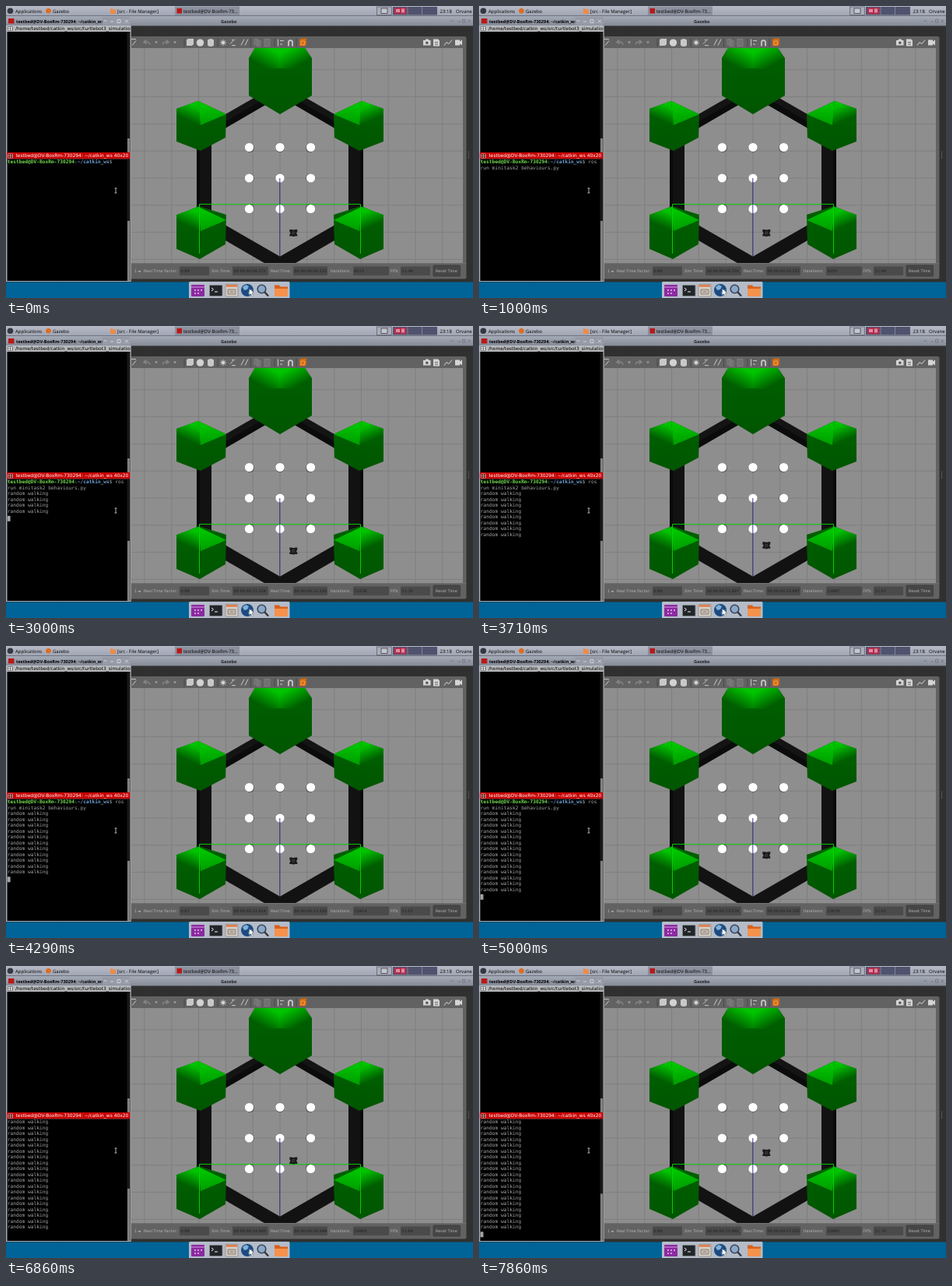
An HTML page that plays this animation: 600x375 px, repeating every 8000 ms.

```html
<!DOCTYPE html>
<html>
<head>
<meta charset="utf-8">
<title>Robot simulation desktop</title>
<style>
  html, body { margin: 0; width: 100%; height: 100%; overflow: hidden; background: #00618f; }
  svg { display: block; width: 600px; height: 375px; }
  text { font: 6px "Open Sans", sans-serif; white-space: pre; text-rendering: geometricPrecision; }
  .bold { font-weight: 700; font-size: 5.6px; }
  .wide { font: 5.95px "DejaVu Sans", sans-serif; }
  .status text { font: 5px "DejaVu Sans", sans-serif; fill: #b4b4b4; }
  .status .value { fill: #202020; }
  .term text { font: 6.23px "DejaVu Sans Mono", monospace; fill: #a4a4a4; }
  .term .host { fill: #70d850; font-weight: 700; }
  .term .dir { fill: #6f9fd0; font-weight: 700; }
</style>
</head>
<body>
<svg viewBox="0 0 600 375" xmlns="http://www.w3.org/2000/svg">
  <defs>
    <linearGradient id="desk" x2="0" y2="1"><stop stop-color="#005c8a"/><stop offset="1" stop-color="#006498"/></linearGradient>
    <linearGradient id="panel" x2="0" y2="1"><stop stop-color="#b6bac6"/><stop offset="1" stop-color="#a0a5b3"/></linearGradient>
    <linearGradient id="bar" x2="0" y2="1"><stop stop-color="#a6abb8"/><stop offset="1" stop-color="#858a97"/></linearGradient>
    <linearGradient id="shade" x2="0" y2="1"><stop stop-color="#006000"/><stop offset="1" stop-color="#005600"/></linearGradient>
    <linearGradient id="headFade" gradientUnits="userSpaceOnUse" x1="346" y1="58" x2="334" y2="80"><stop stop-color="#00c400"/><stop offset="1" stop-color="#005e00"/></linearGradient>
    <linearGradient id="leftFade" gradientUnits="userSpaceOnUse" x1="243" y1="128" x2="235" y2="147"><stop stop-color="#00c400"/><stop offset="1" stop-color="#005e00"/></linearGradient>
    <linearGradient id="rightFade" gradientUnits="userSpaceOnUse" x1="260" y1="127" x2="264" y2="152"><stop stop-color="#00c400"/><stop offset="1" stop-color="#009c00"/></linearGradient>
    <clipPath id="view"><rect x="161" y="54" width="426" height="276"/></clipPath>
    <clipPath id="pane"><rect x="1" y="13" width="158.5" height="340"/></clipPath>
    <g id="lit">
      <path fill="url(#leftFade)" d="M219 132L247 122L250 153L219 153Z"/>
      <path fill="url(#rightFade)" d="M247 122L283 139L250 153Z"/>
    </g>
    <g id="half">
      <path fill="#121212" d="M245 170H264V275H245Z"/>
      <path fill="#0a0a0a" d="M245 170H249V275H245Z"/>
      <path fill="#141414" d="M268 147L322 116L340 123L278 159Z"/>
      <path fill="#0b0b0b" d="M278 159L340 123L331 120L274 153Z"/>
      <path fill="#121212" d="M276 278L352.500 322V342L268 293Z"/>
      <path fill="url(#shade)" d="M219 132L247 122L283 139L282 169L250 186L219 174Z"/>
      <path fill="url(#shade)" d="M219 269L248 257L283 268L282 306L249 325L219 312Z"/>
      <use href="#lit"/><use href="#lit" y="136"/>
    </g>
    <path id="headSide" fill="url(#headFade)" d="M312 67L320 54H352.500V80L312 82Z"/>
  </defs>

  <rect width="600" height="375" fill="url(#desk)"/>

  <!-- simulator window -->
  <rect x="0" y="13" width="600" height="341.500" fill="#303030"/>
  <rect x="0" y="13" width="600" height="12.500" fill="url(#bar)"/>
  <text class="bold" x="276" y="21.700" fill="#222">Gazebo</text>
  <path d="M571.500 18l2 2 2-2M580.500 20h3.500M586.500 17.500h3.500v3.500h-3.500zM593.500 17.500l3.500 3.500m0-3.500l-3.500 3.500" fill="none" stroke="#666a75" stroke-width=".7"/>
  <rect x="140" y="39" width="451.500" height="311.500" rx="2.500" fill="#626262"/>
  <path d="M594.500 187v9" stroke="#777" stroke-dasharray="1 1"/>
  <g id="tools" fill="none" stroke="#c8c8c8" transform="translate(0 .6)">
    <path stroke="#858585" stroke-width="1.500" d="M185 49q-1-5-7-3m2-3l-3 3 4 2M201 49q1-5 7-3m-2-3l3 3-4 2"/>
    <path stroke="#474747" d="M229 41v11M272 41v11M314.500 41v11M345 41v11M373 41v11"/>
    <path d="M161 42h6M162 50l5-6" />
    <path fill="#a0a0a0" stroke="none" d="M191 45h4l-2 3zM215 45h4l-2 3z"/>
    <path fill="#c8c8c8" stroke="none" d="M232 43l2-1.500h7v7l-2 2h-7zM259 43q4-3 8 0v7q-4 3-8 0z"/>
    <circle cx="249.500" cy="46.500" r="4.700" fill="#d2d2d2" stroke="none"/>
    <path d="M275 46.500h8M279 42.500v8M276 43.500l6 6m0-6l-6 6M288 48l6-6M290 50h5M290 43h2M302 50l4-8m1 8l4-8"/>
    <circle cx="279" cy="46.500" r="2" fill="#d8d8d8" stroke="none"/>
    <path stroke="#7c7c7c" fill="#707070" d="M319 42h5v7h-5zM322 44h5v7h-5zM332 42h7v9h-7z"/>
    <path d="M349.500 42v9M352 44h5M352 48.500h3"/>
    <path stroke-width="1.800" d="M363 51v-5a2.500 2.500 0 0 1 5 0v5"/>
    <path fill="#d06a14" stroke="none" d="M377 43l2-2h7v8l-2 2h-7z"/>
    <path stroke="#f5a348" d="M379 44.500h4.500v4.500h-4.500z"/>
    <path fill="#d4d4d4" stroke="none" d="M536 43.500h2.500l1-1.500h3l1 1.500h2v6.500h-9.500zM549 42h6l2 2v7h-8zM577 43h6v2l3-2v7l-3-2v2h-6z"/>
    <circle cx="540.800" cy="46.700" r="1.700" fill="#555" stroke="none"/>
    <path stroke="#666" d="M551 46h4M551 48.500h4"/>
    <path stroke="#d4d4d4" d="M563 50l3-4 3 2 4-5"/>
  </g>

  <g clip-path="url(#view)">
    <rect x="161" y="54" width="426" height="276" fill="#8e8e8e"/>
    <path id="grid" stroke="#7b7b7b" stroke-width=".8"/>
    <use href="#half"/><use href="#half" transform="matrix(-1 0 0 1 704 0)"/>
    <path fill="url(#shade)" d="M312 67L320 54H384L393 67V115L352 139L312 115Z"/>
    <use href="#headSide"/><use href="#headSide" transform="matrix(-1 0 0 1 704 0)"/>
    <g id="dots" fill="#fff"></g>
    <path d="M248.500 318V254.500H455.500V318" fill="none" stroke="#00dc00" stroke-width=".9"/>
    <path d="M351.800 221V322" stroke="#24248c" stroke-width=".9"/>
    <g id="robot" fill="#1b1b1b">
      <path d="M-5 -4.500H-2L-1 -4H1L2 -4.500H5V-1.500L4 -.5V1L5 2V4H2L1 4.500H-1L-2 4H-5V2L-4 1V-.5L-5 -1.500Z"/>
      <circle r="1.900" fill="#444"/><circle r="1" fill="#1b1b1b"/>
    </g>
  </g>

  <g class="status">
    <rect x="161" y="330" width="430" height="1.200" fill="#707070"/>
    <text x="165" y="342">1</text><path d="M169.500 340h4l-2 2.500z" fill="#aaa"/>
    <g id="fields"></g>
    <rect x="549" y="333" width="34.500" height="14" rx="1" fill="#464646" stroke="#333" stroke-width=".6"/>
    <text x="552" y="342">Reset Time</text>
  </g>

  <!-- terminal window -->
  <rect x="0" y="13" width="160.800" height="341" fill="#a4a8b2"/>
  <rect x="0" y="13" width="160.800" height="12" fill="url(#bar)"/>
  <g clip-path="url(#pane)">
    <rect x="3" y="16" width="7.500" height="6.500" fill="#b81818"/>
    <text class="bold" x="13" y="21.700">testbed@DV-BoxRm-730294: ~/catkin_ws</text>
    <rect x="123.500" y="14" width="37" height="10.500" fill="#969ba8"/>
    <path d="M126 18l1.500 2 1.500-2M134 20h4M143 17.500h4v4h-4zM153 17.500l4 4m0-4l-4 4" fill="none" stroke="#e0e2e8" stroke-width=".8"/>
    <rect x="1" y="25" width="160" height="8" fill="#b8b9bc"/>
    <path d="M2.500 26.500h6v5h-6zM5.500 26.500v5M2.500 29h6" fill="#eee" stroke="#444" stroke-width=".6"/>
    <text class="wide" x="12" y="31.200">/home/testbed/catkin_ws/src/turtlebot3_simulations</text>
    <rect x="1.500" y="33" width="158" height="155" fill="#000"/>
    <rect x="155.500" y="33" width="4" height="155" fill="#181818"/>
    <rect x="156" y="170" width="3" height="18" fill="#808080"/>
    <rect x="1" y="188" width="159" height="8.500" fill="#c80000"/>
    <path d="M2.500 190h6v5h-6zM5.500 190v5M2.500 192.500h6" fill="#5c0000" stroke="#ddd" stroke-width=".6"/>
    <text class="wide" x="12.500" y="194.300" fill="#fff">testbed@DV-BoxRm-730294: ~/catkin_ws 40x20</text>
    <rect x="1.500" y="196.500" width="158" height="156.500" fill="#000"/>
    <rect x="155.500" y="196.500" width="4" height="156.500" fill="#181818"/>
    <rect id="thumb" x="156" width="3" fill="#808080"/>
    <g class="term" id="rows"></g>
    <rect id="cursor" width="3.800" height="7" fill="#a4a4a4"/>
  </g>
  <path d="M139.500 234h3M141 234v6M139.500 240h3" stroke="#ddd" stroke-width=".8"/>

  <!-- top panel -->
  <rect width="600" height="12.500" fill="url(#panel)"/>
  <rect y="12" width="600" height="1" fill="#6e727d"/>
  <circle cx="5.500" cy="6.300" r="3.800" fill="#33383f"/>
  <text x="12" y="8.500">Applications</text>
  <circle cx="54.500" cy="6.300" r="3.300" fill="#e06a20"/>
  <text x="60" y="8.500">Gazebo</text>
  <path fill="#ee8a45" d="M134 3.500h3l1 1h3v5.500h-7z"/>
  <text x="143" y="8.500">[src - File Manager]</text>
  <rect x="217" y=".5" width="83" height="11.500" fill="#8b909e"/>
  <rect x="219.500" y="3" width="6.500" height="6.500" fill="#b81818"/>
  <text x="228" y="8.500">testbed@DV-BoxRm-73...</text>
  <rect x="476.500" y="1" width="19" height="10.500" fill="#a9adba" stroke="#55576a" stroke-width=".7"/>
  <rect x="482" y="3" width="8" height="6.500" fill="#c4c7d2" stroke="#333" stroke-width=".7"/>
  <rect x="497" y="1" width="57" height="10.500" fill="#50536e"/>
  <rect x="499" y="2" width="15.500" height="8.500" fill="#b03050"/>
  <path d="M501 4h5v4h-5zM508 3.500h4v5h-4z" fill="#de8aa0"/>
  <path d="M516 1v10.500M534.500 1v10.500" stroke="#8a8da4" stroke-width=".8"/>
  <text x="557.500" y="8.500">23:18</text>
  <text x="578" y="8.500">Orvane</text>

  <!-- dock -->
  <rect x="235" y="354" width="129.500" height="22" rx="1.500" fill="#b4bcc9"/>
  <g id="dock">
    <rect x="238" y="358" width="17" height="15" rx="1" fill="#8b2aa0"/>
    <path d="M238 361h17" stroke="#d695e0"/>
    <path d="M242 365h2m2 0h2m2 0h2M242 369h2m2 0h2" stroke="#e9c2ef" stroke-width="1.500"/>
    <rect x="261.500" y="358.500" width="16.500" height="14" rx="1" fill="#22262a" stroke="#888" stroke-width=".8"/>
    <path d="M264 362l2.500 2-2.500 2M268 367h4" fill="none" stroke="#eee"/>
    <rect x="282" y="357.500" width="16" height="15.500" rx="1" fill="#d4cec6" stroke="#8b7d70" stroke-width=".7"/>
    <path d="M283 359.500h14" stroke="#e2672d" stroke-width="2"/>
    <path d="M285 364h10v6h-10zM288 367h4" fill="#c3b9ae" stroke="#75685d" stroke-width=".7"/>
    <circle cx="310" cy="365" r="8" fill="#1c4a80"/>
    <path d="M304 361l4-3 4 2-2 4-4 1zM311 368l5-4 1 3-4 5z" fill="#7fb2d8"/>
    <path d="M312.500 363v8l2-1.500 1.500 3 1.500-1-1.500-2.500 2.500-.3z" fill="#fff" stroke="#444" stroke-width=".4"/>
    <path d="M332 367l5 5.500" stroke="#343b45" stroke-width="2.500"/>
    <circle cx="328.500" cy="363.500" r="5.300" fill="#88a8cc" stroke="#3b4450" stroke-width="1.600"/>
    <path fill="#d9611c" d="M345 358.500h6l1.500 2h9.500v12h-17z"/>
    <path fill="#f5924c" d="M345 363h17v10h-17z"/>
  </g>
</svg>
<script>
const LOOP = 8000, STEP = LOOP / 56;
const ROWS = 20, ROW_HEIGHT = 7.5, COMMAND_AT = 1000, ENTER_AT = 1650;
const CENTER = { x: 352, y: 221 }, CELL = 34.8, DOT_PITCH = 39.5;
const byId = id => document.getElementById(id);

function add(parent, tag, attrs, content = '') {
  const node = document.createElementNS('http://www.w3.org/2000/svg', tag);
  for (const name in attrs) node.setAttribute(name, attrs[name]);
  node.textContent = content;
  return parent.appendChild(node);
}

// Piecewise linear curve through [time, value] points.
function curve(points, t) {
  let i = 1;
  while (i < points.length - 1 && t > points[i][0]) i++;
  const [t0, a] = points[i - 1], [t1, b] = points[i];
  return a + (b - a) * (t - t0) / (t1 - t0);
}
const hold = (points, t) => points.filter(p => p[0] <= t).pop()[1];

const SIM = [[0, 8270], [2000, 10237], [3000, 11226], [4290, 12416], [5570, 13607], [6860, 14984], [7860, 15983]];
const REAL = [[0, 9213], [2000, 11227], [3000, 12228], [4290, 13432], [5570, 14637], [6860, 16050], [7860, 17053]];
const FACTOR = [[0, '0.89'], [1140, '0.98'], [4140, '0.67'], [5140, '0.89'], [6140, '0.98']];
const FPS = [[0, '11.46'], [1140, '11.50'], [2570, '11.30'], [3570, '11.07'], [5000, '11.02'], [6140, '11.84'], [7290, '11.78']];
const clock = ms => '00 00:00:' + (ms / 1000).toFixed(3).padStart(6, '0');

let gridPath = '';
for (let i = -6; i <= 6; i++)
  gridPath += `M${CENTER.x + i * CELL} 54V330M161 ${CENTER.y + i * CELL}H587`;
byId('grid').setAttribute('d', gridPath);

for (let y = -1; y <= 1; y++) for (let x = -1; x <= 1; x++) {
  const cx = CENTER.x + x * DOT_PITCH, cy = CENTER.y + y * DOT_PITCH;
  add(byId('dots'), 'circle', { cx: cx - x * .9, cy: cy - y * .9, r: 5.4, fill: '#4a4a4a' });
  add(byId('dots'), 'circle', { cx, cy, r: 5.6 });
}

const [factor, simTime, realTime, iterations, fps] = [
  ['Real Time Factor:', 177, 223, 38], ['Sim Time:', 264, 291, 46], ['Real Time:', 340, 369, 44],
  ['Iterations:', 417, 446, 46], ['FPS:', 494, 507, 38]
].map(([label, x, left, width]) => {
  add(byId('fields'), 'text', { x, y: 342 }, label);
  add(byId('fields'), 'rect', { x: left, y: 334.5, width, height: 11.5, rx: 1, fill: '#4a4a4a' });
  return add(byId('fields'), 'text', { x: left + 1.5, y: 342, class: 'value' });
});

const rows = Array.from({ length: ROWS }, (_, i) =>
  add(byId('rows'), 'text', { x: 1.8, y: 202 + i * ROW_HEIGHT }));

function drawTerminal(t) {
  const typed = t >= COMMAND_AT;
  const printed = Math.max(0, Math.floor(4.6 + (t - 3000) / 200));
  const lines = ['$ ' + (typed ? 'ros' : '')];
  if (typed) lines.push('run minitask2 behaviours.py');
  for (let i = 0; i < printed; i++) lines.push('random walking');
  if (t >= ENTER_AT) lines.push('');

  const scrolled = Math.max(0, lines.length - ROWS);
  rows.forEach((row, i) => {
    const line = lines[i + scrolled] || '';
    row.textContent = '';
    if (i + scrolled === 0) {
      add(row, 'tspan', { class: 'host' }, 'testbed@DV-BoxRm-730294');
      add(row, 'tspan', {}, ':');
      add(row, 'tspan', { class: 'dir' }, '~/catkin_ws');
    }
    add(row, 'tspan', {}, line);
  });

  const last = lines.length - 1 - scrolled;
  const column = typed ? lines[lines.length - 1].length : 37;
  byId('cursor').setAttribute('x', 1.8 + column * 3.75);
  byId('cursor').setAttribute('y', 198.8 + last * ROW_HEIGHT);
  byId('cursor').setAttribute('visibility', (t + 1070) % 1200 < 600 ? 'visible' : 'hidden');

  const height = 156 * ROWS / (40.5 + scrolled);
  byId('thumb').setAttribute('y', 353 - height);
  byId('thumb').setAttribute('height', height);
}

function draw(now) {
  const t = Math.floor(((now % LOOP) + 5) / STEP) % 56 * STEP + 2;
  const y = 291.5 - Math.max(0, t - 2750) * .0101;
  byId('robot').setAttribute('transform', `translate(369.3 ${y})`);
  factor.textContent = hold(FACTOR, t);
  simTime.textContent = clock(curve(SIM, t));
  realTime.textContent = clock(curve(REAL, t));
  iterations.textContent = Math.round(curve(SIM, t));
  fps.textContent = hold(FPS, t);
  drawTerminal(t);
}

const start = performance.now();
function tick() {
  draw(performance.now() - start);
  requestAnimationFrame(tick);
}
tick();
</script>
</body>
</html>
```
